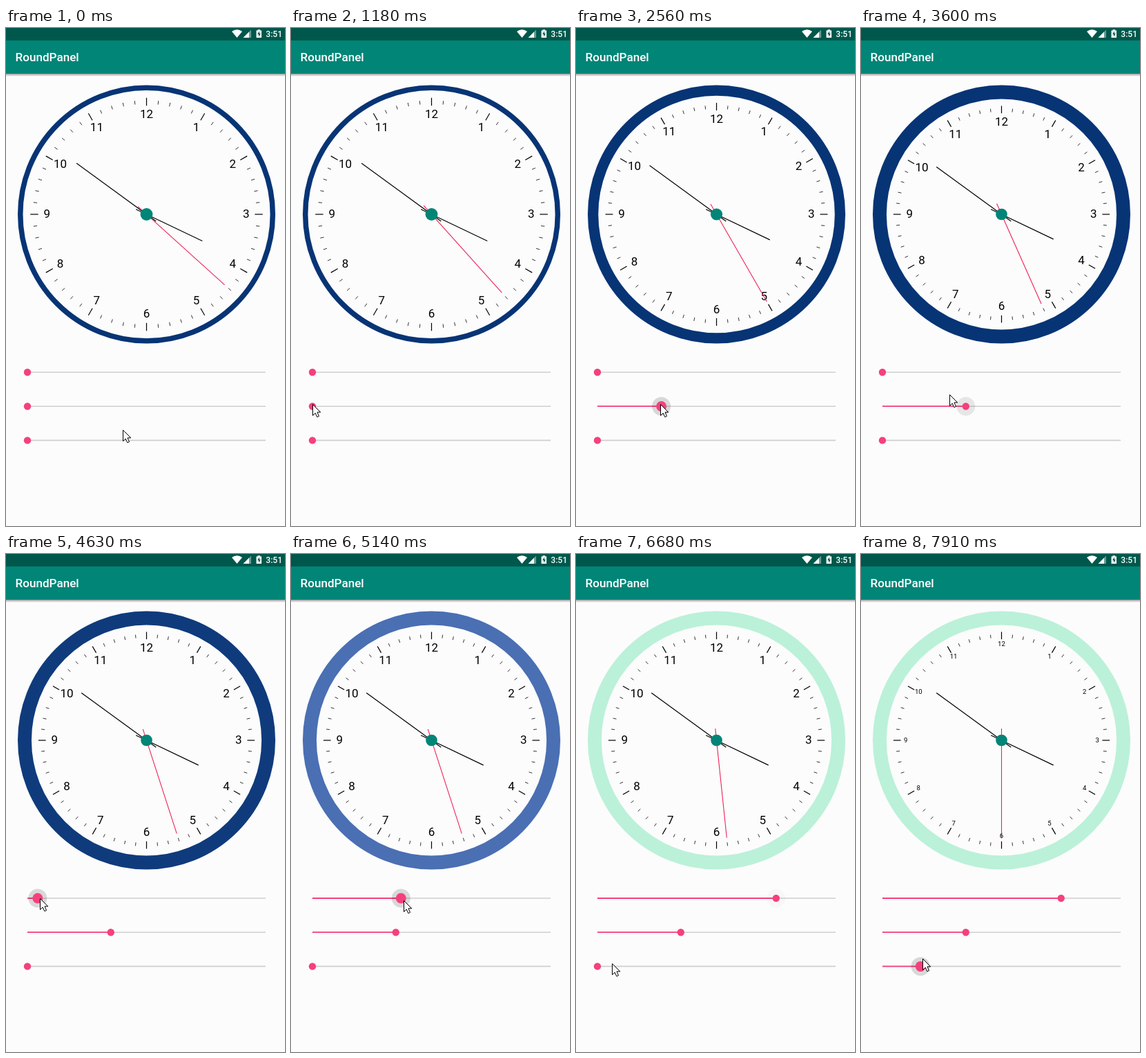
Write an HTML page with a canvas that moves like this. It is 404 px wide and 719 px high and loops after 8000 ms.

```html
<!DOCTYPE html>
<html lang="en">
<head>
<meta charset="utf-8">
<title>Clock</title>
<style>
html, body { margin: 0; width: 100%; height: 100%; overflow: hidden; background: #fcfcfc; }
canvas { display: block; width: 404px; height: 719px; }
</style>
</head>
<body>
<canvas id="stage"></canvas>
<script>
const W = 404, H = 719, LOOP = 8000, TAU = Math.PI * 2;
const CX = 203.5, CY = 269, RADIUS = 186.5;
const TRACK_START = 31, TRACK_LENGTH = 345;
const PINK = '#f5407e', TEAL = '#008577', INK = '#000';

const canvas = document.getElementById('stage');
const ctx = canvas.getContext('2d');
const dpr = window.devicePixelRatio || 1;
canvas.width = W * dpr;
canvas.height = H * dpr;

const clamp = v => Math.min(1, Math.max(0, v));
const mix = (a, b, k) => a + (b - a) * k;
const linear = p => p;
const smooth = p => p * p * (3 - 2 * p);
const power = n => p => p ** n;
const progress = (move, t) => move.ease(clamp((t - move.start) / (move.end - move.start)));

// One drag per slider, top to bottom; "to" is the fraction of the track reached.
const colorDrag = { press: 4390, start: 4420, end: 5870, release: 6400, to: 0.75, ease: smooth };
const widthDrag = { press: 1250, start: 1420, end: 2980, release: 3470, to: 0.35, ease: power(0.85) };
const sizeDrag = { press: 7260, start: 7320, end: 7910, release: LOOP, to: 0.16, ease: power(2.1) };
const drags = [colorDrag, widthDrag, sizeDrag];

const pointerStart = { x: 169, y: 580 };
const pointerMoves = [
  { start: 0, end: 780, ease: linear, x: 31, y: 543 },
  { ...widthDrag, x: 150, y: 543 },
  { start: 3470, end: 3600, ease: linear, x: 128, y: 529 },
  { start: 3600, end: 4140, ease: linear, x: 34, y: 497 },
  { ...colorDrag, x: 294, y: 504 },
  { start: 6400, end: 6680, ease: linear, x: 52, y: 591 },
  { start: 6680, end: 7190, ease: linear, x: 33, y: 595 },
  { ...sizeDrag, x: 89, y: 584 }
];

const ringStops = [
  { at: 0, rgb: [7, 52, 117] },
  { at: 0.37, rgb: [74, 111, 179] },
  { at: 0.704, rgb: [98, 70, 143] },
  { at: 0.75, rgb: [187, 241, 217] }
];

function ringColor(fraction) {
  const i = Math.max(1, ringStops.findIndex(stop => stop.at >= fraction));
  const a = ringStops[i - 1], b = ringStops[i];
  const k = (fraction - a.at) / (b.at - a.at);
  return `rgb(${a.rgb.map((v, c) => Math.round(mix(v, b.rgb[c], k))).join()})`;
}

function pointerAt(t) {
  return pointerMoves.reduce((pos, move) => {
    const k = progress(move, t);
    return { x: mix(pos.x, move.x, k), y: mix(pos.y, move.y, k) };
  }, pointerStart);
}

function disc(x, y, r, color) {
  ctx.fillStyle = color;
  ctx.beginPath();
  ctx.arc(x, y, r, 0, TAU);
  ctx.fill();
}

function line(x1, y1, x2, y2, width, color) {
  ctx.strokeStyle = color;
  ctx.lineWidth = width;
  ctx.beginPath();
  ctx.moveTo(x1, y1);
  ctx.lineTo(x2, y2);
  ctx.stroke();
}

function shape(path, fill) {
  ctx.fillStyle = fill;
  ctx.fill(new Path2D(path));
}

// Line along a clock direction; turn 0 points to twelve.
function spoke(turn, from, to, width, color) {
  const s = Math.sin(turn * TAU), c = -Math.cos(turn * TAU);
  line(CX + s * from, CY + c * from, CX + s * to, CY + c * to, width, color);
}

function text(content, x, y, size, weight, color, align) {
  ctx.font = `${weight} ${size}px Roboto, sans-serif`;
  ctx.fillStyle = color;
  ctx.textAlign = align;
  ctx.fillText(content, x, y);
}

function drawBars() {
  const shadow = ctx.createLinearGradient(0, 66, 0, 70);
  shadow.addColorStop(0, 'rgba(0,0,0,.38)');
  shadow.addColorStop(1, 'rgba(0,0,0,0)');
  ctx.fillStyle = shadow;
  ctx.fillRect(0, 66, W, 4);
  ctx.fillStyle = TEAL;
  ctx.fillRect(0, 18, W, 48);
  ctx.fillStyle = '#00574b';
  ctx.fillRect(0, 0, W, 18);
  text('RoundPanel', 13.5, 48.3, 17.1, 500, '#fff', 'left');
  text('3:51', 400, 13, 12, 500, '#fff', 'right');
  shape('M327 5Q334.5 -.5 342 5L334.5 14Z', '#fff');
  shape('M343.5 14L355 2.5V14Z', 'rgba(255,255,255,.4)');
  shape('M343.5 14L352 5.500V14Z', '#fff');
  shape('M362.5 3.5H364.5V2.3H368V3.5H370V14H362.5Z', '#fff');
  shape('M367 4.5L364 9.2H366V12.7L368.8 8H367Z', '#00574b');
}

function drawClock(ringWidth, color, textSize, seconds) {
  const r = RADIUS - ringWidth;
  ctx.strokeStyle = color;
  ctx.lineWidth = ringWidth;
  ctx.beginPath();
  ctx.arc(CX, CY, RADIUS - ringWidth / 2, 0, TAU);
  ctx.stroke();

  for (let i = 0; i < 60; i++) {
    if (i % 5) spoke(i / 60, r * 0.92, r * 0.89, 0.8, INK);
    else spoke(i / 60, r * 0.94, r * 0.876, 1.2, INK);
  }
  const labelRadius = r * 0.876 - textSize * 0.74;
  for (let n = 1; n <= 12; n++) {
    const a = n / 12 * TAU;
    text(n, CX + Math.sin(a) * labelRadius,
      CY - Math.cos(a) * labelRadius + textSize * 0.355 - 0.9, textSize, 400, INK, 'center');
  }

  const minutes = 51;
  spoke((3 + minutes / 60) / 12, -17, r * 0.5, 1.2, INK);
  spoke(minutes / 60, -17, r * 0.7, 1.2, INK);
  spoke(seconds / 60, -17, r * 0.85, 1.1, '#ee2255');
  disc(CX, CY, r * 0.05, TEAL);
}

function drawSlider(drag, y, fraction, t) {
  const x = TRACK_START + fraction * TRACK_LENGTH;
  const grow = t < drag.release ? clamp((t - drag.press) / 100) : 0;
  const glow = t < drag.release ? grow : clamp(1 - (t - drag.release) / 330);
  line(TRACK_START, y, TRACK_START + TRACK_LENGTH, y, 1.6, '#cfcfcf');
  line(TRACK_START, y, x, y, 1.8, PINK);
  disc(x, y, 13.5, `rgba(0,0,0,${0.14 * glow})`);
  disc(x, y, mix(5.2, 7.5, grow), PINK);
}

function drawPointer({ x, y }) {
  ctx.save();
  ctx.translate(Math.round(x) + 0.5, Math.round(y) + 0.5);
  const arrow = new Path2D('M0 0V16L3.7 12.5L6.3 18.2L9 17L6.5 11.3H11.3Z');
  ctx.fillStyle = '#fff';
  ctx.fill(arrow);
  ctx.strokeStyle = INK;
  ctx.lineWidth = 1;
  ctx.stroke(arrow);
  ctx.restore();
}

function draw(t) {
  const fractions = drags.map(drag => drag.to * progress(drag, t));
  const [hue, width, size] = fractions;
  const ringWidth = t < widthDrag.start ? 7.5 : Math.max(1, width * 57);
  const textSize = t < sizeDrag.start ? 17 : Math.max(1, size * 60);
  const seconds = 22 + Math.floor((t + 560) / 1000);

  ctx.setTransform(dpr, 0, 0, dpr, 0, 0);
  ctx.fillStyle = '#fcfcfc';
  ctx.fillRect(0, 0, W, H);
  drawBars();
  drawClock(ringWidth, ringColor(hue), textSize, seconds);
  drags.forEach((drag, i) => drawSlider(drag, 497 + i * 49.2, fractions[i], t));
  drawPointer(pointerAt(t));
}

const start = performance.now();
function tick() {
  draw((performance.now() - start) % LOOP);
  requestAnimationFrame(tick);
}
tick();
</script>
</body>
</html>
```
